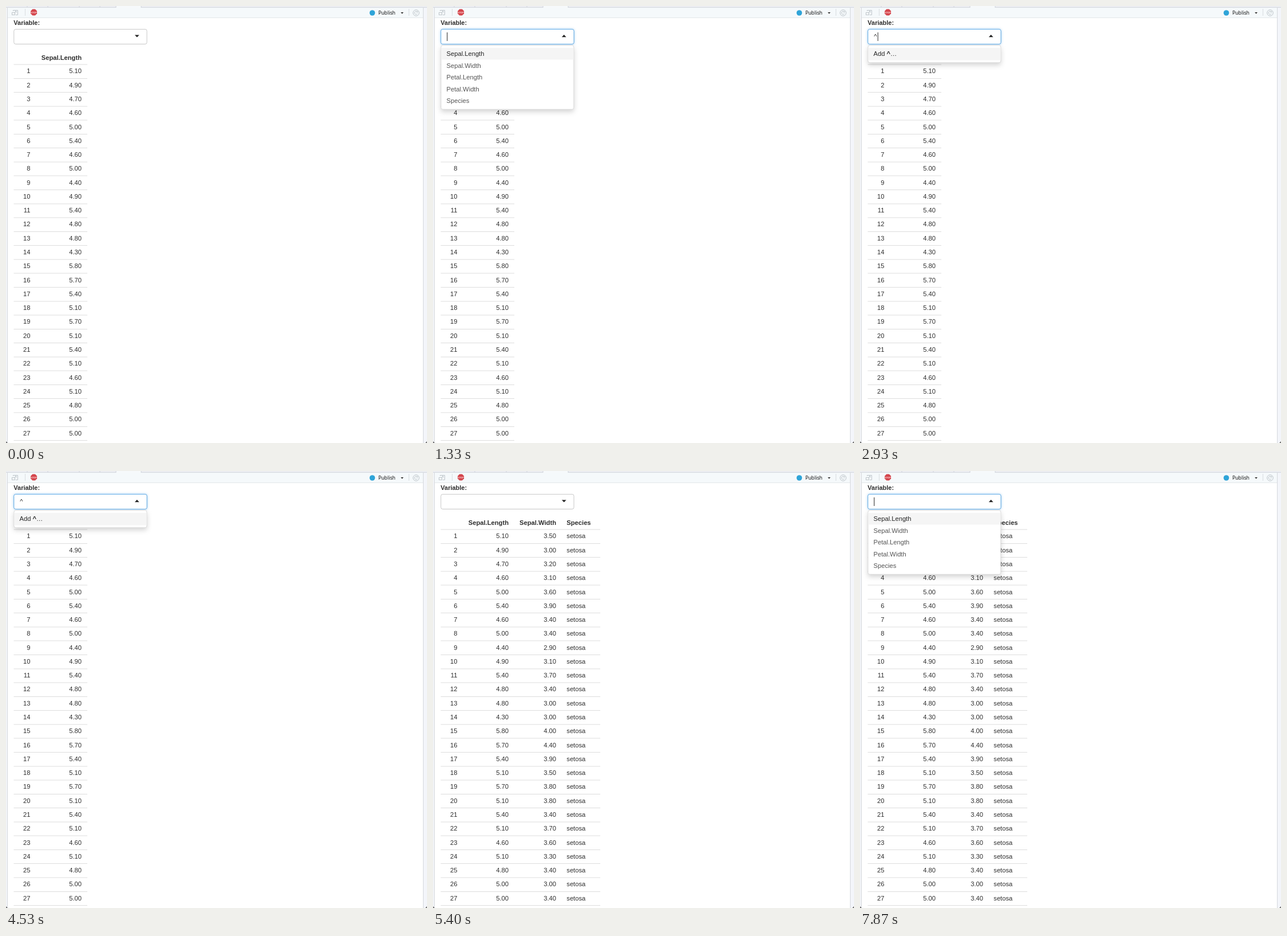
An HTML page that plays this animation: 735x762 px, repeating every 8000 ms.

```html
<!DOCTYPE html>
<html lang="en">
<head>
<meta charset="utf-8">
<title>Variable picker</title>
<style>
  html, body { margin: 0; width: 100%; height: 100%; overflow: hidden; background: #fff; }
  svg { display: block; width: 735px; height: 762px; }
  text { font: 11.2px "Liberation Sans", Arial, sans-serif; fill: #2e2e2e; white-space: pre; }
  .bold { font-weight: 700; }
  .end { text-anchor: end; }
  .rule { stroke: #ddd; fill: none; }
  .option { fill: #555; }
  .option.active { fill: #262626; }
  .panel { fill: #fff; stroke: #d2d2d2; stroke-width: .8; filter: drop-shadow(0 4px 4px rgba(0, 0, 0, .17)); }

  .list, .add, .focus, .wide, .caret { visibility: hidden; animation: 8s step-end infinite; }
  .list { animation-name: list; }
  .add { animation-name: add; }
  .focus { animation-name: focus; }
  .wide { animation-name: wide; }
  .caret { animation-name: caret; }

  @keyframes list {
    0%, 35.25% { visibility: hidden; }
    4%, 95.75%, 100% { visibility: visible; }
  }
  @keyframes add {
    0%, 66.5%, 100% { visibility: hidden; }
    35.25% { visibility: visible; }
  }
  @keyframes focus {
    0%, 66.5% { visibility: hidden; }
    4%, 95.75%, 100% { visibility: visible; }
  }
  @keyframes wide {
    0% { visibility: hidden; }
    67.4%, 100% { visibility: visible; }
  }
  @keyframes caret {
    0%, 10.25%, 22.75% { visibility: hidden; transform: none; }
    4%, 16.5%, 29% { visibility: visible; transform: none; }
    35.25%, 47.75%, 60.25% { visibility: visible; transform: translateX(6.5px); }
    41.5%, 54% { visibility: hidden; transform: translateX(6.5px); }
    66.5% { visibility: hidden; transform: none; }
    95.75%, 100% { visibility: visible; transform: none; }
  }
</style>
</head>
<body>
<svg viewBox="0 0 735 762">
  <rect width="735" height="762" fill="#fff"/>

  <!-- Window frame and toolbar -->
  <rect x="729" width="6" height="762" fill="#f3f5fa"/>
  <rect width="2" height="762" fill="#f3f5f8"/>
  <path d="M2.5 3V762M728.5 3V762" stroke="#d5d8dc"/>
  <rect x="3" y="3" width="725" height="17" fill="#f5f9fb"/>
  <path d="M3 20.5H728" stroke="#e3e7ea"/>
  <rect width="735" height="2" fill="#eceef2"/>
  <rect x="192" width="44" height="3" fill="#f6f9fb"/>
  <path d="M0 2.5H192M236 2.5H735" stroke="#d3d7de"/>
  <path d="M37 0V2M73 0V2M128 0V2M164 0V2M192 0V3M236 0V3" stroke="#cfd3da"/>
  <path d="M0 759V762H3ZM735 759V762H732Z" fill="#666"/>
  <path d="M33.5 5V17M703.5 5V17" stroke="#d9dde0"/>

  <g fill="none" stroke="#bfc6cb">
    <path d="M12.5 9V7.5H20.5V15.5H17"/>
    <rect x="10.5" y="11.5" width="5" height="4"/>
    <path d="M14.5 12L18 9M15.5 9H18V11.5"/>
    <circle cx="716" cy="12" r="5.3"/>
    <path d="M718.3 13.3A2.7 2.7 0 1 1 717.8 10M718.6 8.8V10.8H716.5"/>
  </g>
  <path d="M46.3 5.5H50.9L54.1 8.7V13.3L50.9 16.5H46.3L43.1 13.3V8.7Z" fill="#d4454c"/>
  <text x="48.6" y="12.5" style="font-size:3.8px;font-weight:700;fill:#fbd9da;text-anchor:middle">STOP</text>
  <circle cx="639.5" cy="12" r="4.8" fill="#2fa4d8"/>
  <text x="650" y="15" style="font:8.7px 'Noto Sans',sans-serif;fill:#111">Publish</text>
  <path d="M689.2 11H694L691.6 13.6Z" fill="#222"/>

  <text class="bold" x="13.3" y="33" style="font-size:11px">Variable:</text>

  <!-- Table -->
  <g id="narrow"></g>
  <g id="wide" class="wide"></g>

  <!-- Select box -->
  <rect x="13.8" y="40.6" width="232.2" height="25.8" rx="3" fill="#fff" stroke="#c8c8c8"/>
  <path d="M224.8 50.5H232.6L228.7 54.6Z" fill="#222"/>
  <g class="focus">
    <rect x="13.8" y="40.6" width="232.2" height="25.8" rx="3" fill="#fff" stroke="#66afe9"
          style="filter:drop-shadow(0 0 2px rgba(102,175,233,.6))"/>
    <path d="M224.8 54.2H232.6L228.7 50.1Z" fill="#222"/>
  </g>

  <g id="list" class="list">
    <rect class="panel" x="14" y="68.6" width="231.8" height="111.6" rx="3"/>
    <rect x="14.5" y="73" width="231" height="20.5" fill="#f5f5f5"/>
  </g>
  <g class="add">
    <rect class="panel" x="14" y="68.6" width="231.8" height="30.2" rx="3"/>
    <rect x="14.5" y="73" width="231" height="21.5" fill="#f5f5f5"/>
    <text class="option active" x="23.5" y="87.4">Add <tspan class="bold">^</tspan>…</text>
    <text x="24.2" y="56.8">^</text>
  </g>
  <path class="caret" d="M24.8 46V61" stroke="#222"/>
</svg>

<script>
  const ROW = 24.28;
  const lengths = '5.1 4.9 4.7 4.6 5 5.4 4.6 5 4.4 4.9 5.4 4.8 4.8 4.3 5.8 5.7 5.4 5.1 5.7 5.1 5.4 5.1 4.6 5.1 4.8 5 5'.split(' ');
  const widths = '3.5 3 3.2 3.1 3.6 3.9 3.4 3.4 2.9 3.1 3.7 3.4 3 3 4 4.4 3.9 3.5 3.8 3.8 3.4 3.7 3.6 3.3 3.4 3 3.4'.split(' ');
  const options = ['Sepal.Length', 'Sepal.Width', 'Petal.Length', 'Petal.Width', 'Species'];
  const [narrow, wide, list] = ['narrow', 'wide', 'list'].map(id => document.getElementById(id));

  function add(parent, tag, attrs, text = '') {
    const node = document.createElementNS(parent.namespaceURI, tag);
    for (const key in attrs) node.setAttribute(key, attrs[key]);
    node.textContent = text;
    parent.append(node);
  }
  const label = (parent, x, y, text, cls = '') => add(parent, 'text', { x, y, class: cls }, text);
  const rule = (parent, x1, x2, y) => add(parent, 'path', { d: `M${x1} ${y}H${x2}`, class: 'rule' });
  const fixed = value => Number(value).toFixed(2);

  label(narrow, 132, 93.8, 'Sepal.Length', 'bold end');
  label(wide, 215, 93.8, 'Sepal.Width', 'bold end');
  label(wide, 233.3, 93.8, 'Species', 'bold');

  for (let i = 0; i <= lengths.length; i++) {
    const lineY = Math.round((102 + i * ROW) * 2) / 2;
    rule(narrow, 13.5, 142, lineY);
    rule(wide, 142, 292, lineY);
    if (i === lengths.length) break;
    const y = 117.4 + i * ROW;
    label(narrow, 42.4, y, i + 1, 'end');
    label(narrow, 132, y, fixed(lengths[i]), 'end');
    label(wide, 215, y, fixed(widths[i]), 'end');
    label(wide, 233.3, y, 'setosa');
  }

  options.forEach((name, i) =>
    label(list, 23.5, 87 + i * 20.5, name, i ? 'option' : 'option active'));
</script>
</body>
</html>
```
